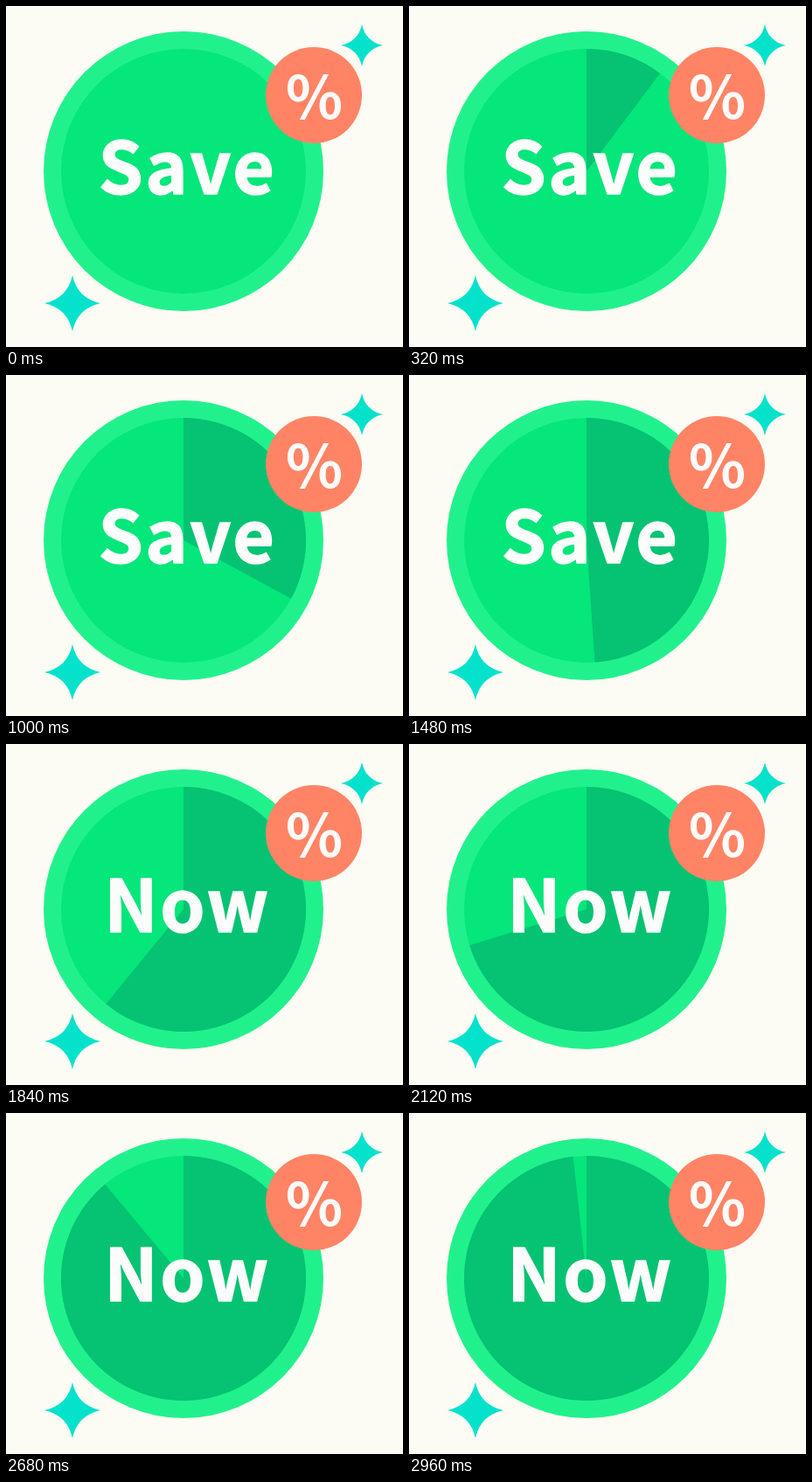
Animation, 454 px wide and 390 px high, one loop 3 s. Source, as an HTML page:

```html
<!DOCTYPE html>
<html lang="en">
<head>
<meta charset="utf-8">
<title>Save Now</title>
<style>
  html, body { margin: 0; width: 100%; height: 100%; overflow: hidden; background: #fcfbf4; }
  svg { display: block; }
  text {
    font-family: "Noto Sans CJK SC", "Noto Sans CJK JP", "Noto Sans CJK", "Open Sans", sans-serif;
    font-weight: 700;
    text-anchor: middle;
    fill: #fcfcfb;
  }
  #word { font-size: 82px; letter-spacing: 2.5px; stroke: #fcfcfb; stroke-width: 1.5px; }
</style>
</head>
<body>
<svg width="454" height="390" viewBox="0 0 454 390">
  <defs>
    <path id="star" d="M0-1C.12-.45 .45-.12 1 0C.45 .12 .12 .45 0 1C-.12 .45-.45 .12-1 0C-.45-.12-.12-.45 0-1Z"/>
  </defs>
  <circle cx="203" cy="189" r="160" fill="#21f18d"/>
  <circle cx="203" cy="189" r="140" fill="#05e67b"/>
  <path id="pie" fill="#05c372"/>
  <text id="word" x="207.5" y="214.5">Save</text>
  <g fill="#05e2cc">
    <use href="#star" transform="translate(407 45) scale(24)"/>
    <use href="#star" transform="translate(76 340) scale(32)"/>
  </g>
  <circle cx="352" cy="102" r="55" fill="#ff8465"/>
  <text x="352.5" y="129" font-size="68">%</text>
</svg>
<script>
  const LOOP = 3000, STEP = 40, CX = 203, CY = 189, R = 140;
  const pie = document.getElementById('pie');
  const word = document.getElementById('word');

  function sector(deg) {
    const a = deg * Math.PI / 180;
    const x = CX + R * Math.sin(a), y = CY - R * Math.cos(a);
    return `M${CX} ${CY}V${CY - R}A${R} ${R} 0 ${deg > 180 ? 1 : 0} 1 ${x} ${y}Z`;
  }

  function draw(now) {
    const t = Math.floor(now % LOOP / STEP) * STEP;
    // the sweep lags slightly behind the clock
    const deg = Math.max(0, t / LOOP * 360 - 1.5);
    pie.setAttribute('d', deg ? sector(deg) : '');
    const label = t < LOOP / 2 ? 'Save' : 'Now';
    if (word.textContent !== label) word.textContent = label;
  }

  const start = performance.now();
  function tick() {
    draw(performance.now() - start);
    requestAnimationFrame(tick);
  }
  tick();
</script>
</body>
</html>
```
